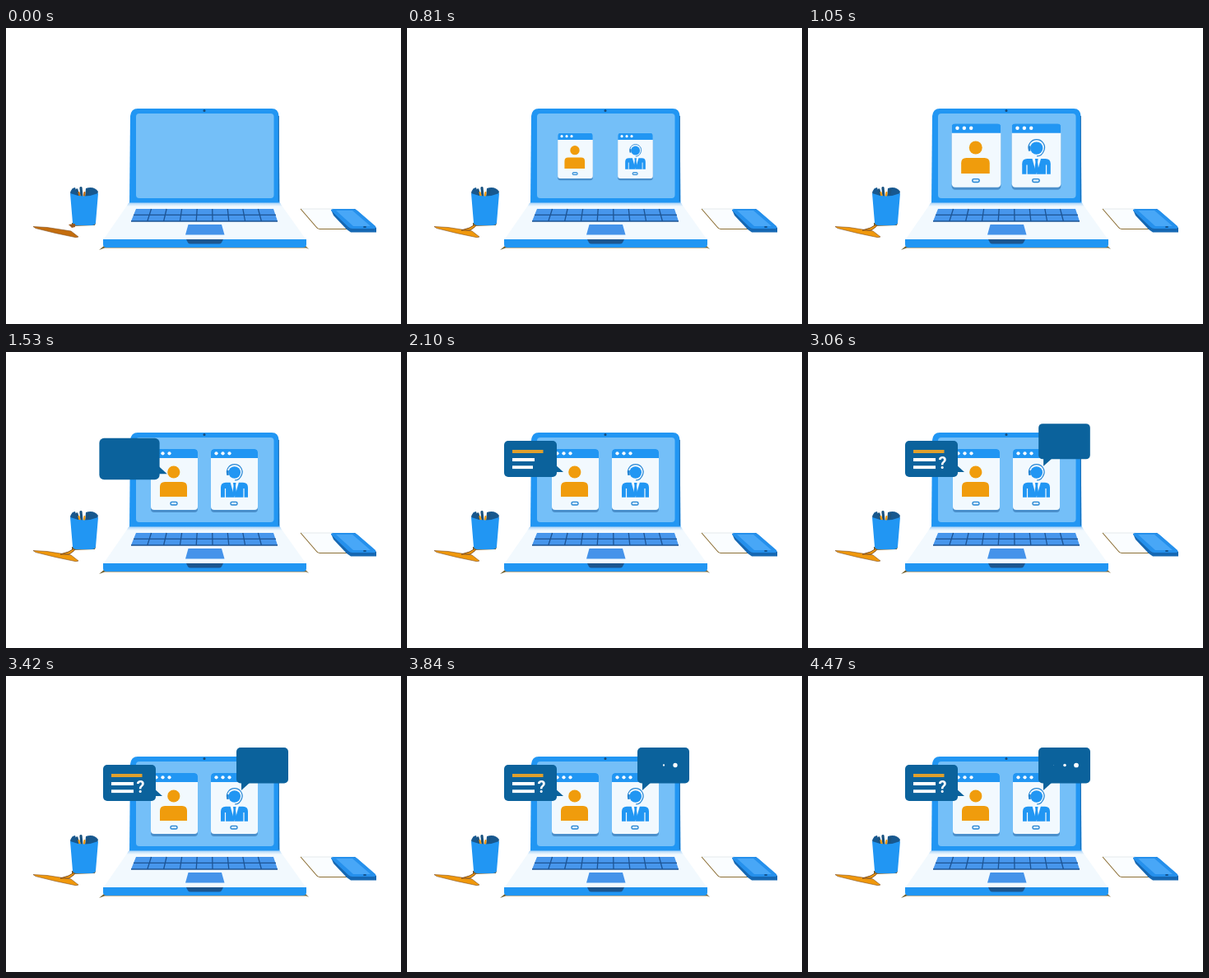
These frames come from a looping animation (480x360 px, 4.5 s). An HTML page:

```html
<!DOCTYPE html>
<html lang="en">
<head>
<meta charset="utf-8">
<title>Online consultation</title>
<style>
  html, body { margin: 0; width: 100%; height: 100%; overflow: hidden; background: #fff; }
  svg { display: block; width: 100vw; height: 100vh; }
  .blue { fill: #2196f3; }
  .deep { fill: #0b629c; }
  .pale { fill: #f2f9fe; }
  .navy { fill: #17588f; }
  text { font: bold 20px Roboto, sans-serif; fill: #fff; text-anchor: middle; }
</style>
</head>
<body>
<svg viewBox="0 0 480 360">
  <defs>
    <linearGradient id="hinge" x2="0" y2="1">
      <stop stop-color="#a9d3f7"/><stop offset="1" stop-color="#f2f9fe"/>
    </linearGradient>
    <g id="window">
      <rect y="8" width="57" height="69" rx="4" fill="#4a8fcb"/>
      <rect width="57" height="74" rx="4" class="pale"/>
      <path d="M0 11V4Q0 0 4 0H53Q57 0 57 4V11Z" class="blue"/>
      <g fill="#fff"><circle cx="6.5" cy="5.3" r="2.1"/><circle cx="14.5" cy="5.3" r="2.1"/><circle cx="22.5" cy="5.3" r="2.1"/></g>
      <rect x="24" y="64.4" width="8" height="3.6" rx="1.6" fill="#d8ecfb" stroke="#2786d4" stroke-width="1.4"/>
    </g>
    <path id="torso" d="M187 176V164Q187 158 193 158H214Q220 158 220 164V176Z"/>
  </defs>

  <!-- laptop -->
  <path d="M150 213L151 107Q152 98 160 98H323Q331 98 331.500 107L332.500 213Z" class="blue"/>
  <path d="M331.300 107V211" stroke="#1c6bb0"/>
  <rect x="158" y="104" width="167.500" height="103" rx="4" fill="#74bff8"/>
  <circle cx="241" cy="100.600" r="1.500" fill="#174a78"/>
  <path d="M113 270L119 265H364L368 269L365 267.500H120Z" fill="#766331"/>
  <path d="M149 213H333L365 258H118Z" class="pale"/>
  <path d="M149 212.500H333L335.500 217H146.500Z" fill="url(#hinge)"/>
  <path d="M118 257H365V263Q365 267 361 267H122Q118 267 118 263Z" class="blue"/>
  <path d="M219 257H264L262 261Q261 262.500 259 262.500H224Q222 262.500 221 261Z" fill="#1c568f"/>
  <path d="M158 220H325L330 235H152Z" fill="#4796ec"/>
  <g id="keys" stroke="#1d5494" stroke-width="1.300"></g>
  <path d="M221.500 239H262L265.500 251.500H218Z" fill="#4593ea"/>

  <!-- cup -->
  <path d="M80 241L108 240L109 237H80Z" fill="#6e5b31"/>
  <path d="M78 200Q80 194 84 194L88 206H80Z" class="navy"/>
  <path d="M96 206L97 195Q107 192 112 199L110 206Z" class="navy"/>
  <g fill="none" stroke-linecap="round" stroke-width="3.200">
    <path d="M86 197L88 205M91 194.500L92 205M100 197L98 205" stroke="#1b5380"/>
    <path class="wood" d="M88.500 200L89.500 204M95.500 200L95 204" stroke-width="2.200"/>
  </g>
  <path d="M78 201Q95 208 112 201L109 237Q108 240 104 240H86Q82 240 81 237Z" class="blue"/>

  <!-- pencil -->
  <path d="M33 241.500L50 242.500L79 247L88 254L85 254.800L60 249.500L36 243.600Z" class="wood" stroke-width=".6"/>
  <path id="clip" d="M66 246L76 243L82 239.500L83.500 241L77 246Z" class="wood"/>
  <path id="stub" d="M76 239L84 238V242L80 243Z" fill="#9b5a20"/>

  <!-- notebook and phone -->
  <path d="M358 220H398L416 244.500H382Q379 245 377 242Z" fill="#fafdff"/>
  <path d="M358 220H398" stroke="#dfe5e8" stroke-width=".8"/>
  <path d="M358 220L377 242Q379 245 382 244.500H414" fill="none" stroke="#8c6f35" stroke-width="1.100"/>
  <path d="M395 221L398 228L414 245L419 248.500H450V243L424 220Z" fill="#1668b3"/>
  <path d="M395 222Q395 220 398 220H422Q425 220 427 222L449 241Q450 244 447 244H421Q418 244 416 242Z" fill="#2590ec"/>
  <path d="M401 222H421L443 241H422Z" fill="#48a7f7"/>
  <ellipse cx="436" cy="242" rx="2" ry="1" fill="#124e86"/>

  <!-- video windows -->
  <g id="client">
    <use href="#window" x="176" y="118"/>
    <g fill="#f09c0c"><circle cx="203.800" cy="146" r="7.600"/><use href="#torso"/></g>
  </g>
  <g id="agent">
    <use href="#window" x="249" y="118"/>
    <circle cx="277.700" cy="146.500" r="7.300" class="blue"/>
    <path d="M269 149A9.300 9.300 0 1 1 286.500 149Q284 156 278 156" fill="none" stroke="#2786d4" stroke-width="1.200"/>
    <path d="M269.500 144V150" stroke="#2786d4" stroke-width="2.400"/>
    <use href="#torso" x="74" y=".800" class="blue"/>
    <path d="M272.500 158L277.700 177L283 158Z" class="pale"/>
    <path d="M276 159H279.500L279 163L280.300 173L277.700 176L275.200 173L276.500 163Z" class="blue"/>
    <path d="M266.500 166V177M289 166V177" stroke="#f2f9fe" stroke-width="1.200"/>
  </g>

  <!-- speech bubbles -->
  <g id="question">
    <path d="M179 136L190 146H178Z" class="deep"/>
    <rect x="118" y="108" width="64" height="44" rx="5" class="deep"/>
  </g>
  <g id="lines">
    <rect x="128" y="119" height="4" fill="#e0a02c"/>
    <rect x="128" y="129" height="4" fill="#fff"/>
    <rect x="128" y="138.300" height="3.800" fill="#fff"/>
  </g>
  <text id="mark" x="163.500" y="142.300">?</text>
  <g id="answer">
    <path d="M286 128V139L297 129Z" class="deep"/>
    <rect x="280" y="87" width="63" height="43.500" rx="5" class="deep"/>
  </g>
  <g id="dots" fill="#fff">
    <circle cx="298.500" cy="108.500"/><circle cx="312" cy="108.500"/><circle cx="326" cy="108.500"/>
  </g>
</svg>
<script>
const LOOP = 4500;
const $ = id => document.getElementById(id);
const clamp = v => Math.max(0, Math.min(1, v));
const wood = document.querySelectorAll('.wood');
const lineWidths = [37.5, 27, 27];

// Keyboard grid: one row divider and slanted column dividers
let grid = 'M152 235H330M155 227.300H328';
for (let i = 1; i < 9; i++) grid += `M${158 + i * 18.55} 220L${152 + i * 19.8} 235`;
$('keys').innerHTML = `<path d="${grid}"/>`;

// Quick growth past full size, then a slower settle
function pop(age, length = 420, peak = 1.15) {
  const rise = length / 3;
  if (age <= 0) return 0;
  return age < rise ? peak * age / rise : 1 + (peak - 1) * clamp((length - age) / (length - rise));
}

function scale(id, cx, cy, s) {
  $(id).setAttribute('transform', `translate(${cx} ${cy}) scale(${s}) translate(${-cx} ${-cy})`);
  $(id).style.display = s ? '' : 'none';
}

function dotRadius(age) {
  if (age < 0 || age > 380) return 0;
  return 3 * (age < 120 ? Math.sin(age / 120 * Math.PI / 2) : (380 - age) / 260);
}

function draw(now) {
  const t = now % LOOP;
  const idle = t < 720;
  wood.forEach(el => {
    const color = idle ? '#c46d0d' : '#f0980c';
    if (el.getAttribute('stroke-width') === '2.200') el.style.stroke = color;
    else {
      el.style.fill = color;
      el.style.stroke = '#805020';
    }
  });
  $('clip').style.display = idle ? 'none' : '';
  $('stub').style.display = idle ? '' : 'none';

  scale('client', 204.5, 156.5, pop(t - 720));
  scale('agent', 277.5, 156.5, pop(t - 720));
  scale('question', 150, 130, pop(t - 1380));
  scale('mark', 163.5, 135, pop(t - 2110, 320));
  scale('answer', 311.5, 108.5, pop(t - 2940));

  [...$('lines').children].forEach((line, i) =>
    line.setAttribute('width', lineWidths[i] * clamp((t - 1740 - i * 125) / 120)));
  [...$('dots').children].forEach((dot, i) =>
    dot.setAttribute('r', Math.max(dotRadius(t - 3430 - i * 130), dotRadius(t - 4115 - i * 130))));
}

const start = performance.now();
function tick() {
  draw(performance.now() - start);
  requestAnimationFrame(tick);
}
tick();
</script>
</body>
</html>
```
